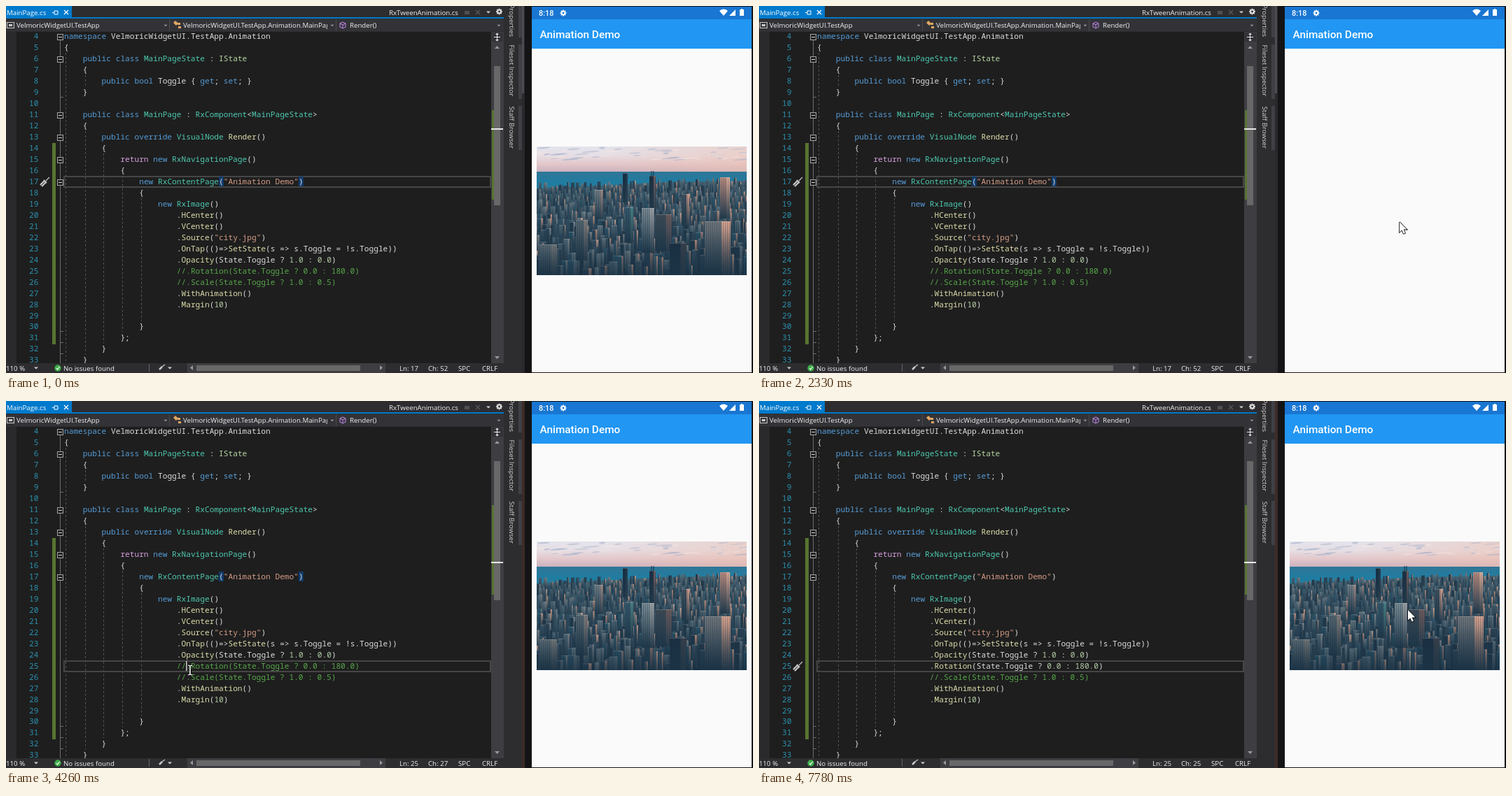
Write an HTML page with a canvas that moves like this. It is 1067x525 px and loops after 8 s.

```html
<!DOCTYPE html>
<html lang="en">
<head>
<meta charset="utf-8">
<title>Animation demo</title>
<style>
html, body { margin: 0; width: 100%; height: 100%; overflow: hidden; background: #1e1e1e; }
canvas { display: block; }
</style>
</head>
<body>
<canvas id="stage" width="1067" height="525"></canvas>
<script>
const LOOP = 8000, STEP = 78;
const CH = 6.7, LINE = 15.98, LEFT = 83;
const MONO = '500 11.17px "Noto Sans Mono", monospace';
const UI = '9.7px "Open Sans", sans-serif';
const PALE = '#dcdcdc';
const stage = document.getElementById('stage').getContext('2d');
let c = stage;

const CODE = `namespace VelmoricWidgetUI.TestApp.Animation
{
    public class MainPageState : IState
    {
        public bool Toggle { get; set; }
    }

    public class MainPage : RxComponent<MainPageState>
    {
        public override VisualNode Render()
        {
            return new RxNavigationPage()
            {
                new RxContentPage("Animation Demo")
                {
                    new RxImage()
                        .HCenter()
                        .VCenter()
                        .Source("city.jpg")
                        .OnTap(()=>SetState(s => s.Toggle = !s.Toggle))
                        .Opacity(State.Toggle ? 1.0 : 0.0)
                        //.Rotation(State.Toggle ? 0.0 : 180.0)
                        //.Scale(State.Toggle ? 1.0 : 0.5)
                        .WithAnimation()
                        .Margin(10)

                }
            };
        }
    }`.split('\n');

// ---------- helpers ----------
const lineY = n => 43 + (n - 4) * LINE;

function rect(x, y, w, h, fill) {
  c.fillStyle = fill;
  c.fillRect(x, y, w, h);
}

function frame(x, y, w, h, color, width = 1) {
  c.strokeStyle = color;
  c.lineWidth = width;
  c.strokeRect(x, y, w, h);
}

function text(s, x, y, color = '#f1f1f1', font = UI) {
  c.font = font;
  c.fillStyle = color;
  c.fillText(s, x, y);
}

function line(color, width, ...p) {
  c.strokeStyle = color;
  c.lineWidth = width;
  c.beginPath();
  for (let i = 0; i < p.length; i += 2) c.lineTo(p[i], p[i + 1]);
  c.stroke();
}

function poly(fill, ...p) {
  c.fillStyle = fill;
  c.beginPath();
  for (let i = 0; i < p.length; i += 2) c.lineTo(p[i], p[i + 1]);
  c.closePath();
  c.fill();
}

function disc(x, y, r, fill) {
  c.fillStyle = fill;
  c.beginPath();
  c.arc(x, y, r, 0, 7);
  c.fill();
}

function cross(x, y, color) {
  line(color, 1.2, x - 3, y - 3, x + 3, y + 3);
  line(color, 1.2, x + 3, y - 3, x - 3, y + 3);
}

const down = (x, y, color = '#d0d0d0', r = 3) => poly(color, x - r, y - r / 2, x + r, y - r / 2, x, y + r / 2);

function gear(x, y, color, hole) {
  for (let i = 0; i < 4; i++) {
    const a = i * Math.PI / 4, dx = 4.4 * Math.cos(a), dy = 4.4 * Math.sin(a);
    line(color, 1.8, x - dx, y - dy, x + dx, y + dy);
  }
  disc(x, y, 3.3, color);
  disc(x, y, 1.4, hole);
}

const KEYWORD = /^(namespace|public|class|bool|get|set|override|new|double|null)$/;
const TYPE = /^(MainPage(State)?|VisualNode|Rx\w+)$/;

function tokenColor(s, next) {
  if (s.startsWith('//')) return '#57a64a';
  if (s[0] === '"') return '#d69d85';
  if (KEYWORD.test(s)) return '#569cd6';
  if (s === 'return') return '#d8a0df';
  if (s === 'IState') return '#b8d7a3';
  if (TYPE.test(s)) return '#4ec9b0';
  if (/^[\d.]*\d$/.test(s)) return '#b5cea8';
  return next === '(' && /\w/.test(s) ? '#dcdcaa' : PALE;
}

function code(s, x, y, font, linked) {
  c.font = font;
  for (const m of s.matchAll(/\/\/.*|"[^"]*"|[\d.]*\d|\w+|\s+|./g)) {
    const link = linked && m[0] === 'Rotation';
    const w = font === MONO ? CH * m[0].length : c.measureText(m[0]).width;
    c.fillStyle = link ? '#569cd6' : tokenColor(m[0], s[m.index + m[0].length]);
    c.fillText(m[0], x, y);
    if (link) c.fillRect(x, y + 1.5, w, 1);
    x += w;
  }
}

// ---------- city picture ----------
function makeCity() {
  const canvas = document.createElement('canvas');
  canvas.width = 300;
  canvas.height = 184;
  c = canvas.getContext('2d');
  let seed = 11;
  const rnd = (a = 0, b = 1) => {
    seed = (seed * 16807) % 2147483647;
    return a + (b - a) * seed / 2147483647;
  };
  const pick = list => list[Math.floor(rnd(0, list.length))];
  const gradient = (x0, y0, x1, y1, ...stops) => {
    const g = c.createLinearGradient(x0, y0, x1, y1);
    stops.forEach((s, i) => g.addColorStop(i / (stops.length - 1), s));
    return g;
  };

  rect(0, 0, 300, 37, gradient(0, 0, 0, 37, '#e3e3ec', '#e6dfe5', '#e3c8cb', '#c9b0bd'));
  rect(0, 0, 300, 37, gradient(90, 0, 300, 0, '#eebfae00', '#eebfae80'));
  for (let i = 0; i < 45; i++) {
    const y = rnd(2, 20), r = 2 + y / 10;
    c.fillStyle = pick(['#a3afc999', '#b3b9cf99', '#f3e6e299']);
    c.beginPath();
    c.ellipse(rnd(0, 300), y, rnd(4, 13), rnd(.6, 4 / r), -.08, 0, 7);
    c.fill();
  }
  rect(0, 36, 300, 40, gradient(0, 36, 0, 68, '#2f7696', '#1f7da2', '#2a7d99'));
  poly(gradient(0, 52, 0, 184, '#40606f', '#2a4658', '#1c3345'),
    0, 60, 70, 57, 130, 54, 180, 51, 300, 49, 300, 184, 0, 184);

  function tower(x, y, w, h, front, side) {
    rect(x, y, w, h, gradient(0, y, 0, y + h, front, '#203a4c'));
    rect(x + w * .65, y, w * .35, h, gradient(0, y, 0, y + h, side, '#2c4151'));
    if (w < 7) return;
    c.globalAlpha = .25;
    for (let i = 2; i < w; i += 3) rect(x + i, y + 1, 1, h, '#152a3b');
    rect(x, y, w, 1, '#c4c0bd');
    c.globalAlpha = 1;
  }

  const fronts = ['#2b4558', '#3a5363', '#20384a', '#4b6371', '#62747e', '#2c5469'];
  const shaded = ['#5c6f7b', '#40586a', '#2c4556', '#7d8488'];
  const sunny = ['#c4917e', '#9b7b72', '#d3a592'];
  for (let row = 0; row < 15; row++) {
    const near = row / 14, base = 60 + near * 128;
    for (let x = -5; x < 300;) {
      const w = rnd(2, 5) + near * rnd(2, 9), h = rnd(2, 9) + near * rnd(4, 24);
      const side = rnd() < .15 + x / 700 ? pick(sunny) : pick(shaded);
      tower(x, base - h - x * .025, w, h + 8, pick(fronts), side);
      x += w + rnd(0, 5 + near * 6);
    }
  }
  tower(123, 38, 7, 42, '#172e43', '#263e51');
  tower(161, 42, 9, 50, '#1c3042', '#6f5a5c');
  line('#1c3042', 1, 164, 35, 164, 43);
  line('#1c3042', 1, 167, 35, 167, 43);
  tower(262, 44, 14, 59, '#b88a7d', '#e0ad98');
  tower(83, 62, 12, 42, '#6f7c84', '#a08b86');
  tower(207, 68, 11, 45, '#3d4f5d', '#cd9b88');
  tower(126, 87, 12, 50, '#35576a', '#478285');
  tower(150, 88, 18, 64, '#778891', '#9da2a5');
  tower(169, 97, 24, 53, '#3d4a56', '#6b5a5c');
  tower(240, 107, 37, 77, '#6e747a', '#d6a18d');
  tower(190, 138, 24, 46, '#1c3144', '#3d434d');
  tower(56, 105, 17, 58, '#53646e', '#827d7c');
  tower(4, 140, 25, 44, '#617079', '#7f817f');
  rect(0, 120, 300, 64, gradient(0, 120, 0, 184, '#142a3c00', '#142a3c66'));
  c = stage;
  return canvas;
}
const city = makeCity();

// ---------- editor ----------
function topBars(dirty) {
  const dx = dirty ? 4 : 0;
  rect(0, 0, 711, 37, '#2d2d30');
  rect(0, 0, 94 + dx, 17, '#007acc');
  rect(0, 16, 711, 2, '#007acc');
  text('MainPage.cs' + (dirty ? '*' : ''), 1, 12.5, '#fff');
  line('#fff', 1, 66 + dx, 9.5, 69 + dx, 9.5, 69 + dx, 7, 74 + dx, 7, 74 + dx, 12, 69 + dx, 12, 69 + dx, 9.5);
  cross(86 + dx, 9, '#fff');
  text('RxTweenAnimation.cs', 547, 12.5);
  rect(655, 7, 7, 5, '#505053');
  cross(674, 9, '#58585b');
  down(689, 9);
  gear(704.5, 8, '#e0e0e0', '#2d2d30');

  rect(0, 19, 711, 17, '#333337');
  for (const x of [233.5, 471.5]) line('#4a4a50', 1, x, 19, x, 36);
  for (const x of [228, 466, 704]) down(x, 28, '#999', 2.5);
  frame(1.5, 23.5, 10, 8, '#c8c8c8');
  rect(4, 26, 5, 3, '#c8c8c8');
  text('VelmoricWidgetUI.TestApp', 15, 31);
  poly('#e0a765', 239, 24, 242, 21, 246, 25, 243, 28);
  rect(245, 24, 4, 3, '#e0a765');
  rect(246, 29, 4, 3, '#e0a765');
  c.save();
  c.beginPath();
  c.rect(250, 19, 209, 17);
  c.clip();
  text('VelmoricWidgetUI.TestApp.Animation.MainPage', 253, 31);
  c.restore();
  cube(481, 27);
  text('Render()', 491, 31);
}

function cube(x, y) {
  const violet = '#b180d7';
  line(violet, 1.1, x, y - 4, x + 4, y - 2, x + 4, y + 3, x, y + 5, x - 4, y + 3, x - 4, y - 2, x, y - 4);
  line(violet, 1.1, x - 4, y - 2, x, y, x + 4, y - 2);
  line(violet, 1.1, x, y, x, y + 5);
}

function margins() {
  rect(0, 37, 15, 474, '#2a2a2c');
  rect(66, 196, 5, 288, '#577430');
  line('#6d6d6d', 1, 77.5, 44, 77.5, 511);
  for (const n of [9, 30, 31, 32]) line('#6d6d6d', 1, 77.5, Math.round(lineY(n)) + 7.5, 82, Math.round(lineY(n)) + 7.5);
  for (const n of [4, 6, 11, 13, 15, 17]) {
    const y = Math.round(lineY(n)) + 1;
    rect(73, y - 4, 9, 9, '#1e1e1e');
    frame(73.5, y - 3.5, 8, 8, '#a5a5a5');
    line('#d8d8d8', 1, 75, y + .5, 80, y + .5);
  }
  c.setLineDash([3, 3]);
  const guides = [[85.5, 6, 33], [113.5, 8, 8], [113.5, 13, 32], [139.5, 15, 31], [166.5, 17, 30], [193.5, 19, 29]];
  for (const [x, a, b] of guides) line('#555', 1, x, lineY(a) - 8, x, lineY(b) + 8);
  c.setLineDash([]);
}

function screwdriver(y) {
  line('#c5c5c5', 1.3, 57, y - 1, 62, y - 6);
  line('#d0d0d0', 5, 50, y + 6, 56, y);
  line('#555', 1.2, 50, y + 6, 56, y);
  line('#c5c5c5', 2, 54, y - 2, 58, y + 2);
}

function scrollbars(row, yellow) {
  rect(693, 37, 18, 474, '#3e3e42');
  rect(694, 38, 16, 13, '#333337');
  line('#e8e8e8', 1, 697, 44.5, 706, 44.5);
  line('#e8e8e8', 1, 701.5, 39, 701.5, 50);
  poly('#e8e8e8', 699, 41, 704, 41, 701.5, 38.5);
  poly('#e8e8e8', 699, 48, 704, 48, 701.5, 50.5);
  poly('#999', 698, 61, 705, 61, 701.5, 57);
  poly('#999', 698, 501, 705, 501, 701.5, 505);
  rect(697, 86, 9, 199, '#686868');
  rect(694, 149, 3, 128, '#577430');
  if (yellow) rect(694, 226, 4, 9, '#eff284');
  rect(693, row === 17 ? 175 : 230, 17, 2, '#e8e8e8');
}

function statusBar(row, col) {
  rect(0, 511, 711, 14, '#2d2d30');
  text('110 %', 0, 522);
  down(43, 518);
  disc(74, 518, 4.7, '#3fae49');
  line('#fff', 1.2, 72, 518, 73.5, 520, 76.5, 516);
  text('No issues found', 82, 522);
  line('#65656a', 1, 204.5, 512, 204.5, 523);
  line('#c8c8c8', 2.5, 219, 520, 223, 516);
  line('#c8c8c8', 1.2, 223, 516, 227, 513);
  down(234, 518);
  rect(259, 511, 283, 14, '#3e3e42');
  rect(272, 514, 234, 8, '#686868');
  poly('#999', 267, 514, 267, 521, 263, 517.5);
  poly('#999', 534, 514, 534, 521, 538, 517.5);
  text('Ln: ' + row, 562, 522);
  text('Ch: ' + col, 603, 522);
  text('SPC', 646, 522);
  text('CRLF', 680, 522);
}

function sidebar(focused) {
  rect(711, 0, 30, 525, '#2d2d30');
  const tabs = [['Properties', -3, 45], ['Fileset Inspector', 55, 133], ['Staff Browser', 143, 206]];
  for (const [name, a, b] of tabs) {
    rect(732, a, 5, b - a, '#3f3f46');
    c.save();
    c.translate(718.5, a + .5);
    c.rotate(Math.PI / 2);
    text(name, 0, 0, '#d0d0d0');
    c.restore();
  }
  rect(737, 0, 4, 525, focused ? '#3d2b27' : '#29292c');
  if (!focused) rect(737, 0, 3, 125, '#4b4b50');
}

function tooltip() {
  rect(261, 387, 495, 41, '#424245');
  frame(261.5, 387.5, 494, 40, '#4d4d50');
  cube(277, 406);
  line('#d0d0d0', 1.2, 282, 408, 282, 413);
  poly('#d0d0d0', 279, 411, 285, 411, 282, 414);
  code('(extension) RxImage RxImage.Rotation<RxImage>(double rotation, [Animations.RxDoubleAnimation', 289, 405.5, UI);
  code('customAnimation = null])', 289, 418.5, UI);
}

function editor(t) {
  const on = (a, b) => t >= a && t < b;
  const clicked = t >= 3950;
  const row = clicked ? 25 : 17;
  const cut = t >= 4510 ? 2 : t >= 4350 ? 1 : 0;
  const col = clicked ? 27 - cut : 52;
  const yellow = on(4350, 7540);

  rect(0, 0, 711, 525, '#1e1e1e');
  margins();
  if (yellow) rect(66, 371, 5, 16, '#eff284');
  frame(83, Math.round(lineY(row)) - 7, 609, 15, '#464646', 2);
  if (t < 4510) for (const i of [33, 50]) rect(LEFT + i * CH, 244, CH, 14, '#113d6f');

  CODE.forEach((s, i) => {
    const n = i + 4, y = lineY(n) + 4;
    c.textAlign = 'right';
    text(n, 46.5, y, '#2b91af', MONO);
    c.textAlign = 'left';
    if (n === 25) s = ' '.repeat(24) + s.trim().slice(cut);
    code(s, LEFT, y, MONO, n === 25 && on(5830, 6760));
  });
  if (clicked && !on(5070, 5600) && t < 7540) rect(LEFT + (col - 1) * CH, 372, 1.3, 14, '#e8e8e8');
  if (t < 4030) screwdriver(251);
  if (t >= 4980) screwdriver(379);

  topBars(on(4350, 7460));
  scrollbars(row, yellow);
  statusBar(row, col);
  sidebar(clicked);
}

// ---------- phone ----------
function opacity(t) {
  const part = (a, b) => Math.min(1, Math.max(0, (t - a) / (b - a)));
  return t < 2250 ? 1 - part(1160, 1940) ** 1.3 : 1 - (1 - part(2330, 2960)) ** 1.3;
}

function phone(t) {
  rect(741, 0, 326, 525, '#141416');
  rect(751, 1, 314, 523, '#fafafa');
  rect(751, 1, 314, 18, '#1976d2');
  rect(751, 19, 314, 42, '#2196f3');
  text('8:18', 761, 14, '#fff', '500 10.9px Roboto, sans-serif');
  gear(796, 10, '#fff', '#1976d2');
  poly('#fff', 1019, 7, 1022, 5, 1025, 4.5, 1028, 5, 1031, 7, 1025, 14);
  poly('#fff', 1033, 14, 1042, 14, 1042, 5);
  rect(1048, 5, 6, 9, '#fff');
  rect(1050, 4, 2, 1, '#fff');
  text('Animation Demo', 762.5, 46, '#fff', '500 15.4px Roboto, sans-serif');
  c.globalAlpha = opacity(t);
  c.drawImage(city, 758, 201);
  c.globalAlpha = 1;
}

// ---------- mouse pointer ----------
const PATH = [
  [450, 959, 506], [920, 915, 309], [2400, 915, 309], [2880, 352, 404], [3030, 348, 411],
  [3190, 348, 411], [3870, 263, 385], [4820, 263, 385], [5060, 285, 386],
  [6760, 285, 386], [7380, 937, 309], [7540, 929, 301], [7620, 929, 301], [7780, 927, 299]
];

function pointerAt(t) {
  const i = PATH.findIndex(p => p[0] > t);
  if (i < 0) return PATH[PATH.length - 1].slice(1);
  const [a, x, y] = PATH[i - 1], [b, x2, y2] = PATH[i];
  const k = (t - a) / (b - a);
  return [x + (x2 - x) * k, y + (y2 - y) * k];
}

function outlined(points) {
  line('#000', 1.6, ...points, points[0], points[1]);
  poly('#fff', ...points);
}

function pointer(t, step) {
  if (t < 450 || (t >= 4510 && t < 4670)) return;
  const [x, y] = pointerAt(step);
  c.save();
  c.translate(x, y);
  if (t >= 5830 && t < 6760) {
    outlined([0, 1, 2, 0, 4, 1, 4, 6, 7, 6, 10, 8, 10, 13, 8, 18, 2, 18, -3, 11, -2, 9.5, 0, 11]);
  } else if (x < 693) {
    line('#000', 2.2, 1, -7, 1, 8);
    line('#fff', 1.1, -3, -7, 0, -6, 0, 6, -3, 7);
    line('#fff', 1.1, 3, -7, 0, -6, 0, 6, 3, 7);
  } else {
    outlined([0, 0, 0, 14.5, 3.3, 11.5, 5.6, 16.8, 8, 15.8, 5.7, 10.6, 10.4, 10.6]);
  }
  c.restore();
}

function draw(now) {
  const t = now % LOOP;
  // Motion advances in short, even steps.
  const step = t < 450 ? t : 450 + Math.floor((t - 438) / STEP) * STEP;
  editor(t);
  phone(step);
  if (t >= 4980 && t < 6760) tooltip();
  pointer(t, step);
  requestAnimationFrame(draw);
}
requestAnimationFrame(draw);
</script>
</body>
</html>
```
